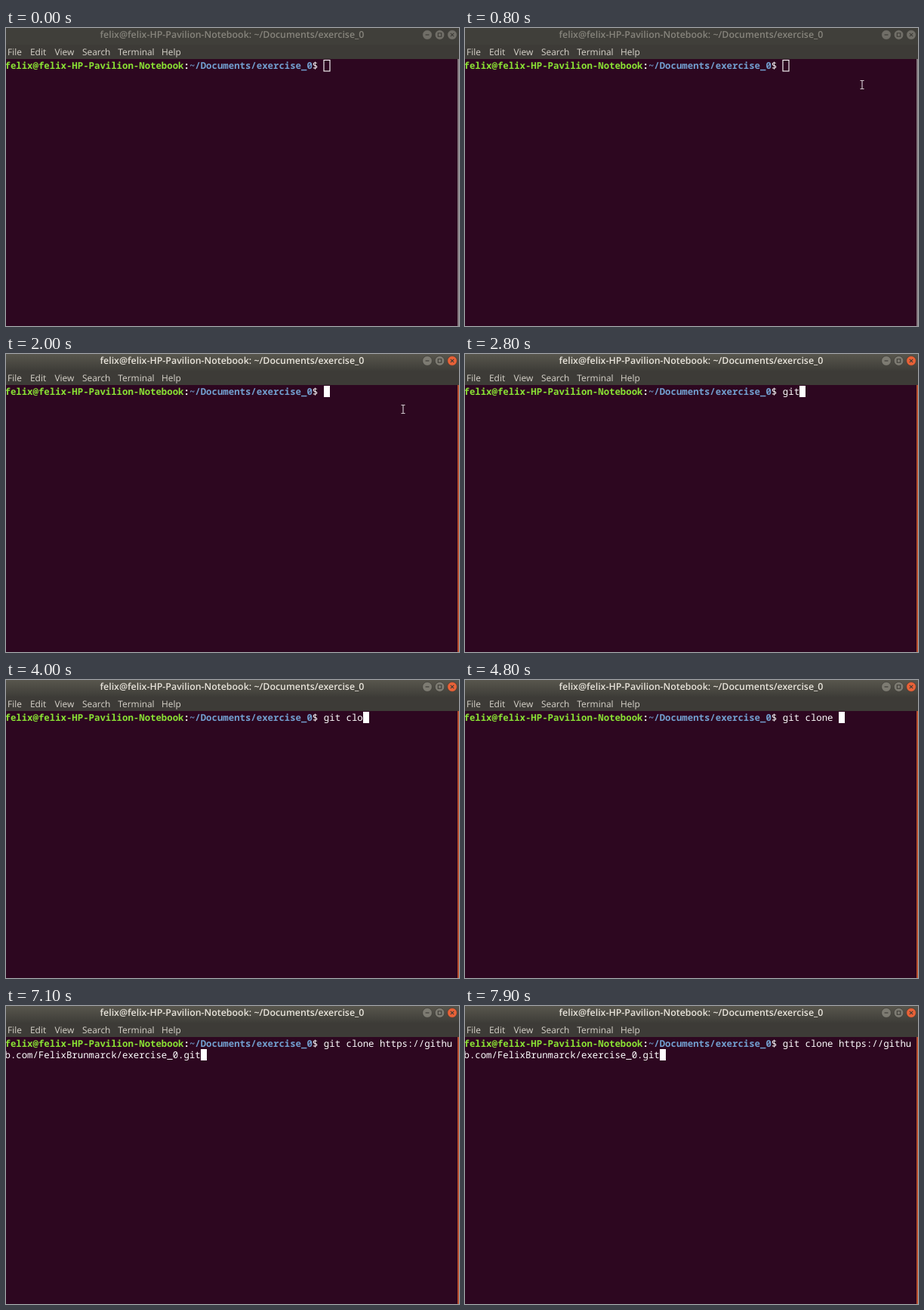
An HTML page that plays this animation: 600 px wide and 394 px high, repeating every 8000 ms.

```html
<!DOCTYPE html>
<html lang="en">
<head>
<meta charset="utf-8">
<title>Terminal</title>
<style>
  html, body { margin: 0; width: 100%; height: 100%; overflow: hidden; background: #2d0720; }
  svg { display: block; width: 600px; height: 394px; }
  text { white-space: pre; text-rendering: geometricPrecision; }
  .ui { font: 11.9px "Open Sans", "Noto Sans", sans-serif; fill: #d8d4cb; }
  #title { font-weight: 600; font-size: 12.4px; text-anchor: middle; fill: #86847c; }
  .mono { font: 500 12.35px "Noto Sans Mono", "DejaVu Sans Mono", monospace; fill: #fff; }
  .bold { font-weight: 700; }
  .btn circle { fill: #706e67; stroke: #3a3934; stroke-width: .7; }
  .btn path { fill: none; stroke: #3b3a35; stroke-width: 1.1; }
  #bar { fill: #403f3a; }
  #edge { fill: #85797f; }
  .focused #bar { fill: url(#shine); }
  .focused #edge { fill: #b9502f; }
  .focused #title { fill: #e8e4db; }
  .focused .btn circle { fill: #7d7b72; }
  .focused .btn.close circle { fill: #ea6237; }
  #caret { fill: none; stroke: #fff; stroke-width: 1.1; }
  .focused #caret { fill: #fff; stroke: none; }
  #mouse { fill: none; stroke: #d8d0d5; stroke-width: 1.1; }
</style>
</head>
<body>
<svg id="stage" viewBox="0 0 600 394">
  <defs>
    <linearGradient id="shine" x2="0" y2="1">
      <stop stop-color="#58564d"/>
      <stop offset="1" stop-color="#3e3d38"/>
    </linearGradient>
  </defs>
  <rect width="600" height="394" fill="#2d0720"/>
  <rect y="21" width="600" height="20" fill="#3d3b37"/>
  <rect id="bar" width="600" height="22"/>
  <rect id="edge" x="598" y="41" width="2" height="353"/>
  <text id="title" class="ui" x="299.5" y="13.3">felix@felix-HP-Pavilion-Notebook: ~/Documents/exercise_0</text>

  <g class="btn" transform="translate(558 9)"><circle r="6.4"/><path d="M-2.5 0H2.5"/></g>
  <g class="btn" transform="translate(574.5 9)"><circle r="6.4"/><path d="M-2.2-2.2H2.2V2.2H-2.2Z"/></g>
  <g class="btn close" transform="translate(591 9)"><circle r="6.4"/><path d="M-2.2-2.2L2.2 2.2M2.2-2.2L-2.2 2.2"/></g>

  <g class="ui">
    <text x="2" y="36">File</text>
    <text x="32" y="36">Edit</text>
    <text x="64.5" y="36">View</text>
    <text x="101" y="36">Search</text>
    <text x="148.3" y="36">Terminal</text>
    <text x="206" y="36">Help</text>
  </g>

  <text class="mono bold" x="-1.5" y="54"><tspan fill="#8ae234">felix@felix-HP-Pavilion-Notebook</tspan>:<tspan fill="#729fcf">~/Documents/exercise_0</tspan><tspan font-weight="500">$</tspan></text>
  <text id="line1" class="mono" y="54"></text>
  <text id="line2" class="mono" x="-1.5" y="69"></text>
  <rect id="caret" height="15" width="8"/>
  <path id="mouse" d="M-2.5-5.5H-.8L0-5L.8-5.5H2.5M0-5V5M-2.5 5.5H-.8L0 5L.8 5.5H2.5"/>
</svg>
<script>
const $ = id => document.getElementById(id);
const LOOP = 8000, FOCUS = 900, BLINK_OFF = 1300, BLINK_ON = 1900, PASTE = 6800;
const COLS = 80, PROMPT = 57, CELL = 7.41, LEFT = -1.5;
const typed = 'git clone ';
const url = 'https://github.com/FelixBrunmarck/exercise_0.git';
const keys = [2400, 2700, 2800, 3100, 3500, 3800, 4000, 4200, 4400, 4700];

const colX = col => LEFT + col * CELL;
const ease = (t, a, b) => {
  const p = Math.min(1, Math.max(0, (t - a) / (b - a)));
  return p * p * (3 - 2 * p);
};
const show = (el, on) => el.setAttribute('visibility', on ? 'visible' : 'hidden');

$('line1').setAttribute('x', colX(PROMPT));

function draw(t) {
  const focused = t >= FOCUS;
  $('stage').classList.toggle('focused', focused);

  const count = keys.filter(k => k <= t).length;
  const command = typed.slice(0, count) + (t >= PASTE ? url : '');
  const room = COLS - PROMPT;
  $('line1').textContent = command.slice(0, room);
  $('line2').textContent = command.slice(room);

  const cell = PROMPT + command.length;
  const inset = focused ? 0 : 0.5;
  $('caret').setAttribute('x', Math.round(colX(cell % COLS)) + inset - (focused ? 0 : 0.5));
  $('caret').setAttribute('y', 42 + inset + 15 * Math.floor(cell / COLS));
  $('caret').setAttribute('height', 15 - inset);
  show($('caret'), t < BLINK_OFF || t >= BLINK_ON);

  // The pointer slides in from the right and hides on the first key.
  const slide = ease(t, 200, 750);
  const x = 606 - 80 * slide;
  const y = 130 - 55 * slide - 2 * ease(t, 1000, 1400);
  $('mouse').setAttribute('transform', `translate(${x} ${y})`);
  show($('mouse'), t >= 200 && t < keys[0]);
}

const start = performance.now();
function tick() {
  draw((performance.now() - start) % LOOP);
  requestAnimationFrame(tick);
}
tick();
</script>
</body>
</html>
```
